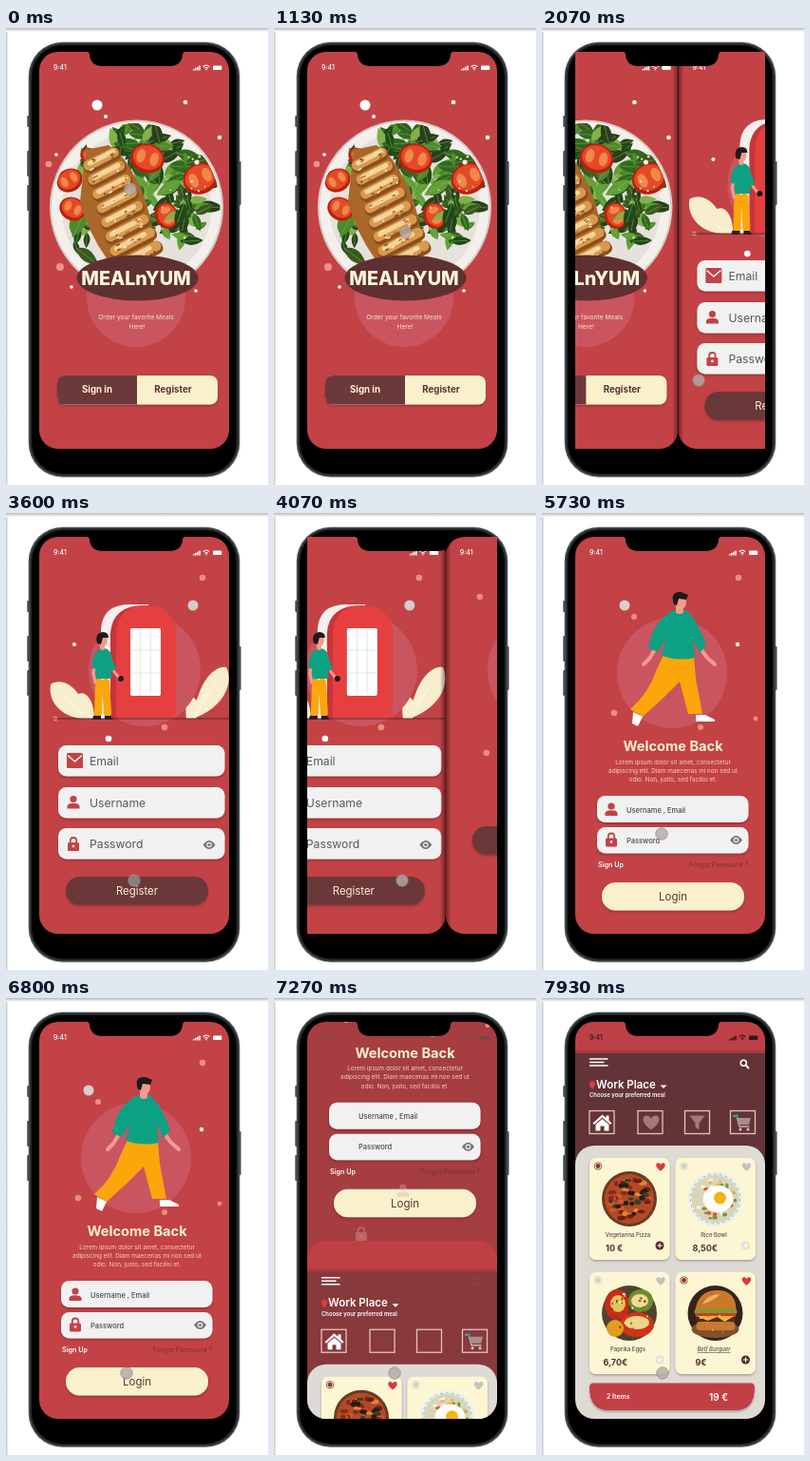
These frames come from a looping animation (276 by 480 pixels, 8 s). An HTML page:

```html
<!DOCTYPE html>
<html lang="en">
<head>
<meta charset="utf-8">
<title>Food ordering app</title>
<style>
html, body { margin: 0; width: 100%; height: 100%; overflow: hidden; background: #fff; }
svg { display: block; width: 276px; height: 480px; font-family: Inter, "Open Sans", sans-serif; }
</style>
</head>
<body>
<svg id="stage" viewBox="0 0 276 480"></svg>
<script>
const RED = '#c34246', BROWN = '#633437', CREAM = '#faf1cc', GREEN = '#0da184',
      YELLOW = '#fba60a', SKIN = '#f29b8c', INK = '#20191c', PINK = '#c95560';

// Drawing helpers
const circle = (x, y, r, fill, more = '') => `<circle cx="${x}" cy="${y}" r="${r}" fill="${fill}" ${more}/>`;
const oval = (x, y, rx, ry, fill, more = '') => `<ellipse cx="${x}" cy="${y}" rx="${rx}" ry="${ry}" fill="${fill}" ${more}/>`;
const box = (x, y, w, h, r, fill, more = '') => `<rect x="${x}" y="${y}" width="${w}" height="${h}" rx="${r}" fill="${fill}" ${more}/>`;
const shape = (d, fill, more = '') => `<path d="${d}" fill="${fill}" ${more}/>`;
const stroke = (d, color, w = 1) => `<path d="${d}" fill="none" stroke="${color}" stroke-width="${w}" stroke-linecap="round" stroke-linejoin="round"/>`;
const text = (x, y, size, str, fill, weight = 400, anchor = 'start', more = '') =>
  `<text x="${x}" y="${y}" font-size="${size}" fill="${fill}" font-weight="${weight}" text-anchor="${anchor}" ${more}>${str}</text>`;
const mid = (x, y, size, str, fill, weight, more) => text(x, y, size, str, fill, weight, 'middle', more);
const at = (x, y, body, scale = 1, turn = 0) => `<g transform="translate(${x} ${y}) rotate(${turn}) scale(${scale})">${body}</g>`;
const group = (id, body) => `<g id="${id}">${body}</g>`;
const clipped = (clip, body) => `<g clip-path="url(#${clip})">${body}</g>`;
const SHADOW = 'filter="url(#soft)"';
const dots = (list, fill) => list.map(([x, y, r]) => circle(x, y, r, fill)).join('');

let seed = 7;
const rand = () => (seed = (seed * 16807) % 2147483647) / 2147483647;
const repeat = (n, fn) => Array.from({ length: n }, (_, i) => fn(i)).join('');
const pick = list => list[Math.floor(rand() * list.length)];

// Icons, centred on 0,0
const mail = box(-8.5, -8, 17, 16, 1.5, RED) + stroke('M-7 -5L0 1L7 -5', '#fff', 1.3);
const user = fill => circle(0, -3.5, 3.6, fill) + shape('M-6.5 6.5V4Q-6 .8 0 .8T6.5 4V6.5Z', fill);
const lock = fill => stroke('M-3.2 -1V-4Q-3.2 -7 0 -7T3.2 -4V-1', fill, 1.8) + box(-6, -2, 12, 9, 1.5, fill) + circle(0, 2, 1.4, '#f3dcdb');
const eye = shape('M-6.5 0Q0 -9 6.5 0Q0 9 -6.5 0Z', '#77777a') + circle(0, 0, 2.8, '#efefef') + circle(0, 0, 1.6, '#77777a');
const heart = fill => shape('M0 5C-11 -3 -3 -8 0 -3C3 -8 11 -3 0 5Z', fill);
const house = shape('M-10 1L0 -8L4 -4.5V-7H7V-2L10 1L8.5 2.5L0 -5L-8.5 2.5ZM-7 2.5L0 -3.6L7 2.5V9H2V4H-2V9H-7Z', '#fff');
const funnel = shape('M-8 -7H8L2 1V8L-2 5V1Z', '#a17b7c');
const cart = stroke('M-9 -7H-6L-3 4H7', '#c9b4b2', 1.4) + shape('M-5.5 -5H9L7 2H-3.5Z', '#a98c8c') +
  circle(-2, 7, 1.5, '#d8c8c6') + circle(6, 7, 1.5, '#d8c8c6') + circle(-6, -7, 2, GREEN);
const search = stroke('M2 2L4.5 4.5', '#fff', 1.8) + `<circle cx="-.7" cy="-.7" r="3" fill="none" stroke="#fff" stroke-width="1.5"/>`;

const status = color => text(50, 44.3, 7, '9:41', color, 500) +
  repeat(4, i => box(197 + i * 2.1, 43 - i * 1.2, 1.5, 1.6 + i * 1.2, .4, color)) +
  stroke('M208 40.5Q211 37.8 214 40.5M209.6 42.2Q211 41 212.4 42.2', color, 1.1) + circle(211, 43.8, .8, color) +
  box(218, 39.5, 9.3, 4.6, 1.2, color);
const pill = (y, label, fill, ink, size = 11.4) =>
  box(63, y, 150, 29.5, 14.5, fill, SHADOW) + mid(138, y + 19, size, label, ink);
const field = (x, y, w, h) => box(x, y, w, h, 8.5, '#f1f1f1', SHADOW);

// Food
const leaf = (x, y, len, turn, fill) => at(x, y,
  shape(`M0 0Q${len * .35} ${-len * .45} ${len} 0Q${len * .4} ${len * .4} 0 0Z`, fill) +
  stroke(`M0 0H${len * .8}`, '#8fae5b', .5), 1, turn);
const tomato = (x, y, r, turn = 0) => at(x, y, oval(0, 0, r, r * .86, '#b9200f') + oval(0, -1, r * .86, r * .7, '#e44a27') +
  oval(-r * .4, -1, r * .25, r * .4, '#f0884a') + oval(r * .4, -1, r * .25, r * .4, '#f0884a'), 1, turn);

function salad() {
  const greens = ['#2f6a1e', '#1f4a17', '#4d8a2c', '#5f9f35', '#82b04a', '#38591f', '#27401b'];
  const bed = (n, x, y, rx, ry) => repeat(n, () => {
    const a = rand() * 6.28, d = Math.sqrt(rand());
    return leaf(x + Math.cos(a) * d * rx, y + Math.sin(a) * d * ry, 12 + rand() * 18, rand() * 360, pick(greens));
  });
  const slice = i => at(101 + i * 5.5, 139 + i * 14.5,
    box(-21 - i, -7, 42 + i * 2, 14, 6, '#8a4f1d') + box(-20 - i, -7, 40 + i * 2, 10.5, 5, '#d99a4e') + box(-15 - i, -5.5, 32 + i, 5, 2.5, '#f3d39a') +
    repeat(9, () => oval(rand() * 38 - 19, rand() * 11 - 6, 1 + rand() * 1.6, .8, pick(['#7d421a', '#b06a24', '#fbe8bd']))), 1, -27);
  return circle(137.5, 188, 91.5, '#d5cdc6') + circle(137.5, 188, 89.5, '#f3efeb') + circle(137.5, 189, 79, '#e6e1dc') +
    clipped('plate',
      bed(90, 175, 178, 36, 58) + bed(28, 137, 122, 26, 13) + bed(14, 76, 212, 12, 22) + bed(8, 84, 143, 8, 10) +
      tomato(67, 160, 14, -30) + tomato(70, 190, 14, 25) + tomato(88, 135, 10, 40) +
      tomato(149, 137, 18, 15) + tomato(205, 158, 19, -25) + tomato(169, 197, 14, 70) + bed(8, 192, 185, 16, 14) +
      shape('M84 128L108 123Q126 135 136 157Q155 190 157 242H106Q86 214 78 182Z', '#a9672a') + repeat(8, slice) +
      repeat(20, () => circle(165 + rand() * 50, 125 + rand() * 105, .6 + rand() * .8, '#dbe5b0')));
}

const speckle = (n, reach, sizes, colors) => repeat(n, () => {
  const a = rand() * 6.28, d = Math.sqrt(rand()) * reach;
  return oval(Math.cos(a) * d, Math.sin(a) * d, sizes + rand() * sizes, sizes * .8 + rand(), pick(colors));
});
const pizza = circle(0, 0, 29, '#6b3a20') + circle(0, 0, 26, '#b34a26') +
  speckle(44, 22, 2.2, ['#8f2717', '#d98a3a', '#cf5a2c', '#6a1f16']) + speckle(16, 20, 2, ['#314426', '#241d1b']);
const rice = circle(0, 0, 29, '#eef0ed') + circle(0, 0, 25, '#d9d5b8') +
  speckle(50, 21, 1.5, ['#e8b25c', '#70963f', '#d75a3c', '#f4efd9']) +
  oval(3, 0, 16, 14, '#fffdf6') + circle(5, -1, 6.5, '#f6b316') + `<circle r="26" fill="none" stroke="#7ac4bc" stroke-width="1" stroke-dasharray="3 3"/>`;
const peppers = circle(0, 0, 29, '#4f4330') +
  oval(-13, -9, 13, 16, '#c92a18') + oval(-12, -10, 8, 9, '#e7c35c') + oval(12, -13, 13, 12, '#6c8f2a') + oval(11, -13, 9, 7, '#f0d997') +
  oval(8, 12, 18, 13, '#cf3417') + oval(8, 10, 13, 7, '#efd48a') + oval(-15, 16, 9, 9, '#e29c21') + speckle(24, 21, .8, ['#567a26', '#fff2ca', '#8e2a14']);
const burger = circle(0, 0, 29, '#34231d') + oval(0, 17, 25, 9, '#83512a') +
  shape('M-21 -3Q-18 -24 2 -24T22 -3Z', '#c87929') + shape('M-14 -9Q-8 -20 5 -20Q0 -14 -14 -9Z', '#efb262') +
  box(-22, -4, 45, 5, 2, '#7a9c32') + box(-21, 0, 43, 4, 2, '#cf3b25') + box(-20, 3, 41, 7, 3, '#55291a') +
  shape('M-20 3H20L10 9L2 4L-8 8Z', '#f2b531') + box(-20, 9, 41, 9, 4, '#c57a30') + speckle(10, 22, .8, ['#f3d093', '#d8612a']);

// Screens
const base = box(35, 25, 200, 418, 0, RED);

const splash = base +
  dots([[45, 143, 3.3], [57, 251, 4], [101, 290, 2.5], [173, 282, 4]], '#e9938b') +
  dots([[96, 81, 5.5], [105, 93, 2], [189, 78, 2.3], [225, 115, 2.3], [53, 133, 1.8], [69, 272, 1.8], [200, 276, 1.8]], '#fff') +
  circle(137, 283, 52, PINK) + salad() + circle(201, 141, 2.5, '#fff') +
  oval(138.5, 262.5, 64, 24, '#5f3032') + mid(137, 270, 19.8, 'MEALnYUM', '#fff7dd', 800) +
  mid(137, 306, 6.6, 'Order your favorite Meals', '#fbe4d4') + mid(138, 316, 6.6, 'Here!', '#fbe4d4') +
  box(54, 365, 169, 30.5, 8, CREAM, SHADOW) + shape('M138 365H62Q54 365 54 373V387.5Q54 395.5 62 395.5H138Z', '#6c393b') +
  mid(96, 383, 9.7, 'Sign in', '#fff2d3', 700) + mid(176, 383, 9.7, 'Register', '#5a3031', 700);

const bush = shape('M47 180C55 174 68 178 76 190C84 186 93 196 93 216H80C58 214 44 198 47 180Z', '#f8edcd') +
  stroke('M82 213Q66 198 54 186', '#fff', .7);
const booth = circle(146, 165, 59, PINK) +
  shape('M100 216V122Q102 96 130 96H150V216Z', '#f6eeee') +
  shape('M110 216V126Q112 97 146 97Q179 99 179 128V216Z', '#c7343a') +
  shape('M116 216V126Q118 97 148 97Q179 99 179 128V216Z', '#e5403f') +
  box(131, 121, 32, 71, 2, '#fff') + stroke('M141.6 122V191M152.2 122V191M132 144H162M132 168H162', '#d8d6da', .7);
const visitor = stroke('M98 178L97 210M105 178L107 210', YELLOW, 8) +
  shape('M92 213H100V217H91ZM104 213H110L113 217H104Z', INK) +
  shape('M94 174V150Q96 142 103 142Q111 143 111 152V174Z', GREEN) + stroke('M95 150L92 168L94 178', SKIN, 3.5) + stroke('M95 149L93 161', GREEN, 5) +
  stroke('M109 150L114 167L120 174', SKIN, 3) + stroke('M108 150L113 163', GREEN, 5) +
  box(99, 136, 5, 8, 2, SKIN) + oval(102, 134, 5, 6, SKIN) + shape('M96 137Q93 126 102 125Q108 125 108 131L102 131L100 138Z', INK);
const register = base +
  dots([[207, 68, 3.3], [167, 225, 3.3], [52, 216, 2.4]], '#ee8d7b') +
  dots([[72, 138, 2], [108, 237, 3.3]], '#fff') + circle(197, 97, 5.5, '#d1cccd') +
  bush + shape('M190 216Q187 190 198 194Q207 201 200 216Z', '#f8edcd') +
  shape('M197 216C201 182 217 160 232 162C240 177 231 204 197 216Z', '#f8edcd') + stroke('M200 213Q212 186 229 170', '#fff', .7) +
  booth + visitor + circle(121, 174, 3, INK) + stroke('M50 216H235', '#4a2328', .9) +
  [['Email', 244], ['Username', 288], ['Password', 331]].map(([label, y]) => field(55, y, 175.5, 32.5) + text(88, y + 20.7, 12.2, label, '#58585c')).join('') +
  at(72.5, 260, mail) + at(71, 304, user(RED)) + at(71, 348, lock(RED)) + at(214, 348.5, eye) +
  pill(382, 'Register', '#6a3739', '#fff0d8');

const face = oval(0, 0, 7, 8, SKIN) + shape('M-8 -2Q-9 -11 0 -11Q10 -10 8 0L5 -5Q-2 -3 -6 -5Z', INK) + stroke('M-3 4Q0 6 3 3', '#a13c3c', .8);
const complete = base + circle(137, 165, 58, PINK) +
  dots([[71, 88, 3.3], [218, 103, 3.3], [78, 252, 3.3], [204, 259, 3.3], [194, 291, 2.6]], '#e98b84') +
  dots([[165, 47, 2.2], [206, 138, 2.2], [114, 315, 2.2]], '#fff') + circle(116, 81, 5.5, '#d6cfcf') +
  box(104, 99, 67, 142, 7, '#dcc6c8') + box(96, 96, 67, 147, 7, '#40232b') + box(98, 98, 63, 143, 5, 'url(#flame)') +
  shape('M113 97H148L145 103H116Z', '#40232b') +
  box(106, 167, 53, 11, 0, '#fff') + box(106, 182, 53, 12, 0, '#fff') + box(114, 203, 35, 13, 1.5, GREEN) + stroke('M128 209L131 212L136 206.5', '#fff', 1.2) +
  stroke('M184 184L203 207L226 215', YELLOW, 15) + stroke('M179 186L174 210L167 238', YELLOW, 15) +
  shape('M224 212L231 208L229 228L214 227L224 222Z', INK) + shape('M163 241H173L176 248H159Z', INK) +
  at(137, 148, box(-19, -25, 38, 49, 1, '#fff') + box(-16, -22, 32, 39, 0, '#e7dde0') + shape('M-13 17Q-11 6 0 6T13 17Z', GREEN) + at(0, -4, face), 1, -10) +
  shape('M162 158Q172 149 189 156Q198 168 190 184Q177 188 165 180Z', GREEN) +
  stroke('M168 160Q151 172 126 154', GREEN, 9) + circle(122, 150, 4, SKIN) + stroke('M170 158L164 145', GREEN, 8) + stroke('M163 142L157 138', SKIN, 5) +
  box(172, 146, 7, 10, 3, SKIN) + at(176, 139, face, 1.15, 12) +
  mid(138, 280, 14.7, 'Registration', CREAM, 700) + mid(138, 296.5, 14.7, 'Complete', CREAM, 700) + pill(329, 'Continue', '#6a3739', '#fff0d8');

const walker = circle(137, 168, 58, PINK) +
  stroke('M121 140L113 153L107 159', SKIN, 4) + stroke('M165 140L174 152L182 159', SKIN, 4) +
  shape('M128 149H160L162 174L169 211H154L145 177L128 194L106 214L93 206Q112 190 121 164Z', YELLOW) +
  shape('M96 209L106 214L101 224L95 221Z', '#fff') + shape('M162 212H172L182 217V219H162Z', '#fff') +
  shape('M137 103Q146 99 153 103Q165 115 173 139L166 147L159 133L161 152Q145 156 126 150L130 132L122 146L112 142Q116 115 137 103Z', GREEN) +
  box(141, 96, 8, 10, 3, SKIN) + oval(146, 94, 6, 7, SKIN) + shape('M139 96Q134 82 147 83L154 86L152 91L144 90L142 97Z', INK);
const login = walker +
  dots([[207, 68, 3.3], [97, 109, 3], [76, 210, 3.3], [167, 225, 3], [225, 216, 2.4]], '#ee8d7b') +
  circle(206, 138, 2.2, '#fff') + circle(87, 97, 5.5, '#d6cfcf') +
  mid(138, 250, 14.6, 'Welcome Back', CREAM, 700) +
  ['Lorem ipsum dolor sit amet, consectetur', 'adipiscing elit. Diam maecenas mi non sed ut', 'odio. Non, justo, sed facilisi et.']
    .map((line, i) => mid(138, 263.5 + i * 9.2, 6.4, line, '#f5d0bd')).join('') +
  field(58, 297, 159.5, 28) + field(58, 330, 159.5, 27.5) + text(89, 314.5, 7.5, 'Username , Email', '#48484c', 500) + text(89, 346.5, 7.5, 'Password', '#48484c', 500) +
  at(204.5, 343.5, eye) + text(59, 372, 7.2, 'Sign Up', '#fff', 600) + text(155, 372, 7.1, 'Forgot Password ?', '#7d3032') +
  pill(388, 'Login', CREAM, '#5d3436', 11.5);

function card(x, y, food, name, price, priceX, chosen, liked, darkPlus, more) {
  const mark = chosen ? '#8c3130' : '#cfcbc4';
  return box(x, y, 84.5, 107, 7, '#fcf6d3', SHADOW) +
    circle(x + 9, y + 8.5, 2.4, mark) + `<circle cx="${x + 9}" cy="${y + 8.5}" r="3.8" fill="none" stroke="${mark}" stroke-width=".8"/>` +
    at(x + 75, y + 9.5, heart(liked ? '#dc3540' : '#c3c0bf'), .85) + at(x + 42, y + 43, food) +
    mid(x + 40.5, y + 83, 5.9, name, '#57484a', 500, more) + text(priceX, y + 98, 9, price, '#552e30', 700) +
    circle(x + 74, y + 92, 4.5, darkPlus ? '#512a2c' : '#e4dfcf') + stroke(`M${x + 71.8} ${y + 92}h4.4m-2.2 -2.2v4.4`, '#fff', 1.1);
}
const frames = [50, 101, 150.5, 198.5].map(x => `<rect x="${x}" y="118.5" width="26" height="24" fill="none" stroke="#e5c4b9" stroke-width="1.3"/>`).join('');
const home = group('brown', box(35, 57, 200, 386, 0, BROWN)) + box(35, 25, 200, 32, 0, '#bd4045') + box(35, 55, 200, 3, 0, '#a73b40') +
  stroke('M50.5 64H69M50.5 67.5H65M50.5 71H69', '#fff', 1.4) +
  shape('M53 96Q49 91 50 89Q53 85 56 89Q57 91 53 96Z', '#d83d45') + text(57, 94.7, 11.5, 'Work Place', '#fff', 600) +
  shape('M124.5 91.5H131.5L128 95Z', '#fff') + text(50, 104, 5.9, 'Choose your preferred meal', '#fff', 600) +
  frames + at(63.5, 130.5, house) + at(211, 131, cart) +
  group('late', at(213, 69, search) + at(115, 131, heart('#a17b7c'), 1.5) + at(163.5, 130.5, funnel)) +
  box(35, 155, 200, 310, 20, '#dedbd5') +
  card(50, 168, pizza, 'Vegetarina Pizza', '10 €', 67, true, true, true) +
  card(140.5, 168, rice, 'Rice Bowl', '8,50€', 158.5, false, false, false) +
  card(50, 288, peppers, 'Paprika Eggs', '6,70€', 64.5, false, false, false) +
  card(140.5, 288, burger, 'Belf Burguer', '9€', 161.5, true, true, true, 'font-style="italic" text-decoration="underline"') +
  shape('M54 404.5H220Q224 404.5 224 409Q224 433 204 433H70Q50 433 50 409Q50 404.5 54 404.5Z', '#c03f45', SHADOW) +
  text(68, 421, 6.9, '2 Items', '#fff', 600) + text(176, 422.5, 10, '19 €', '#fff', 600);

const screen = (id, body) => group(id, clipped('page', body));
document.getElementById('stage').innerHTML = `
<defs>
  <clipPath id="page"><rect x="35" y="25" width="200" height="417" rx="20"/></clipPath>
  <clipPath id="glass"><rect x="35" y="25" width="200" height="417"/></clipPath>
  <clipPath id="plate"><circle cx="137.5" cy="188" r="88"/></clipPath>
  <filter id="soft" x="-10%" y="-20%" width="120%" height="150%"><feDropShadow dx="0" dy="1.5" stdDeviation="1.3" flood-color="#301012" flood-opacity=".3"/></filter>
  <linearGradient id="flame" x2="1" y2="1"><stop stop-color="#e8443d"/><stop offset=".5" stop-color="#f2704f"/><stop offset="1" stop-color="#e5403f"/></linearGradient>
  <linearGradient id="top" x2="0" y2="1"><stop stop-color="#b9b9b9"/><stop offset="1" stop-color="#fff"/></linearGradient>
  <linearGradient id="side"><stop stop-color="#c4c4c4"/><stop offset="1" stop-color="#fff"/></linearGradient>
  <linearGradient id="fold"><stop stop-color="#200808" stop-opacity="0"/><stop offset=".5" stop-color="#200808" stop-opacity=".5"/><stop offset="1" stop-color="#200808" stop-opacity="0"/></linearGradient>
</defs>` +
  box(0, 0, 276, 480, 0, '#fff') + box(0, 0, 2.5, 480, 0, 'url(#side)') + box(0, 0, 276, 4, 0, 'url(#top)') +
  [[92, 12], [129, 27], [165, 27]].map(([y, h]) => box(22.3, y, 3, h, 1, '#394143')).join('') + box(244.5, 140, 3, 46, 1, '#394143') +
  box(23.7, 14.7, 222.6, 457, 36, '#4b5355') + box(25.2, 16.2, 219.6, 454, 34.5, '#23282a') + box(27.2, 18.2, 215.6, 450, 32.5, '#000') +
  clipped('glass',
    screen('splash', splash + status('#fff')) + screen('register', register + status('#fff')) + screen('complete', complete + status('#fff')) +
    screen('login', base + group('shade', box(35, 25, 200, 418, 0, BROWN)) + group('loginBody', login) + screen('home', home) +
      group('lightStatus', status('#fff')) + group('darkStatus', status('#32181a'))) +
    group('seam', box(-6, 25, 12, 418, 0, 'url(#fold)')) +
    group('user', user('currentColor')) + group('lock', lock('currentColor'))) +
  shape('M84 24.5Q88 25 88 28Q89 40 102 40H172Q185 40 186 28Q186 25 190 24.5Z', '#000') +
  group('cursor', circle(0, 0, 6.3, '#b3a9a8', 'fill-opacity=".82" stroke="#8b7f7f" stroke-width=".8" stroke-opacity=".7"') + group('press', circle(0, 0, 5.6, '#6f6566')));

// Motion
const LOOP = 8000, SLIDE = 500;
const STARTS = { register: 1835, complete: 3900, login: 5110, home: 7038 };
const POINTER = [[0, 131, 169], [900, 131, 169], [1650, 165, 370], [2400, 165, 370], [3200, 135, 386], [4300, 135, 386],
  [4800, 126, 335], [5800, 126, 337], [6600, 127, 394], [LOOP, 127, 394]];
const PRESSES = [1750, 3600, 5000, 6950];

const el = id => document.getElementById(id);
const ease = x => { x = Math.min(1, Math.max(0, x)); return x * x * (3 - 2 * x); };
const lerp = (a, b, p) => a + (b - a) * p;
const move = (id, x, y) => el(id).setAttribute('transform', `translate(${x} ${y})`);
const fade = (id, value) => { el(id).style.opacity = Math.max(0, value); };

function draw(t) {
  const slid = name => ease((t - STARTS[name]) / SLIDE);
  const across = slid('register') + slid('complete') + slid('login');
  const up = slid('home');

  ['splash', 'register', 'complete', 'login'].forEach((id, i) => {
    const x = 200 * (i - across);
    move(id, x, 0);
    el(id).style.display = Math.abs(x) < 200 ? '' : 'none';
  });
  move('seam', 235 - 200 * (across % 1), 0);
  fade('seam', across % 1 ? 1 : 0);

  // The last change scrolls inside a fixed page whose colour blends to brown
  move('loginBody', 0, -417 * up);
  move('home', 0, 417 * (1 - up));
  fade('shade', up * .7);
  fade('brown', up);
  fade('late', up ** 4);
  fade('lightStatus', 1 - 1.7 * up);
  fade('darkStatus', up);

  // Field icons drift towards the header icons
  const enter = 200 * (3 - across);
  [['user', 73, 311.5, 213, 69], ['lock', 73, 343.5, 115, 131]].forEach(([id, x, y, toX, toY]) => {
    move(id, enter + lerp(x, toX, up), lerp(y, toY, up));
    fade(id, 1 - 1.4 * up);
    el(id).style.color = up > .15 ? '#e8a9a2' : RED;
  });

  const k = POINTER.findIndex(point => point[0] > t);
  const [t0, x0, y0] = POINTER[k - 1], [t1, x1, y1] = POINTER[k];
  const p = ease((t - t0) / (t1 - t0));
  move('cursor', lerp(x0, x1, p), lerp(y0, y1, p));
  fade('press', .5 * Math.max(...PRESSES.map(at => 1 - Math.abs(t - at) / 160)));
}

function tick() {
  draw(performance.now() % LOOP);
  requestAnimationFrame(tick);
}
tick();
</script>
</body>
</html>
```
